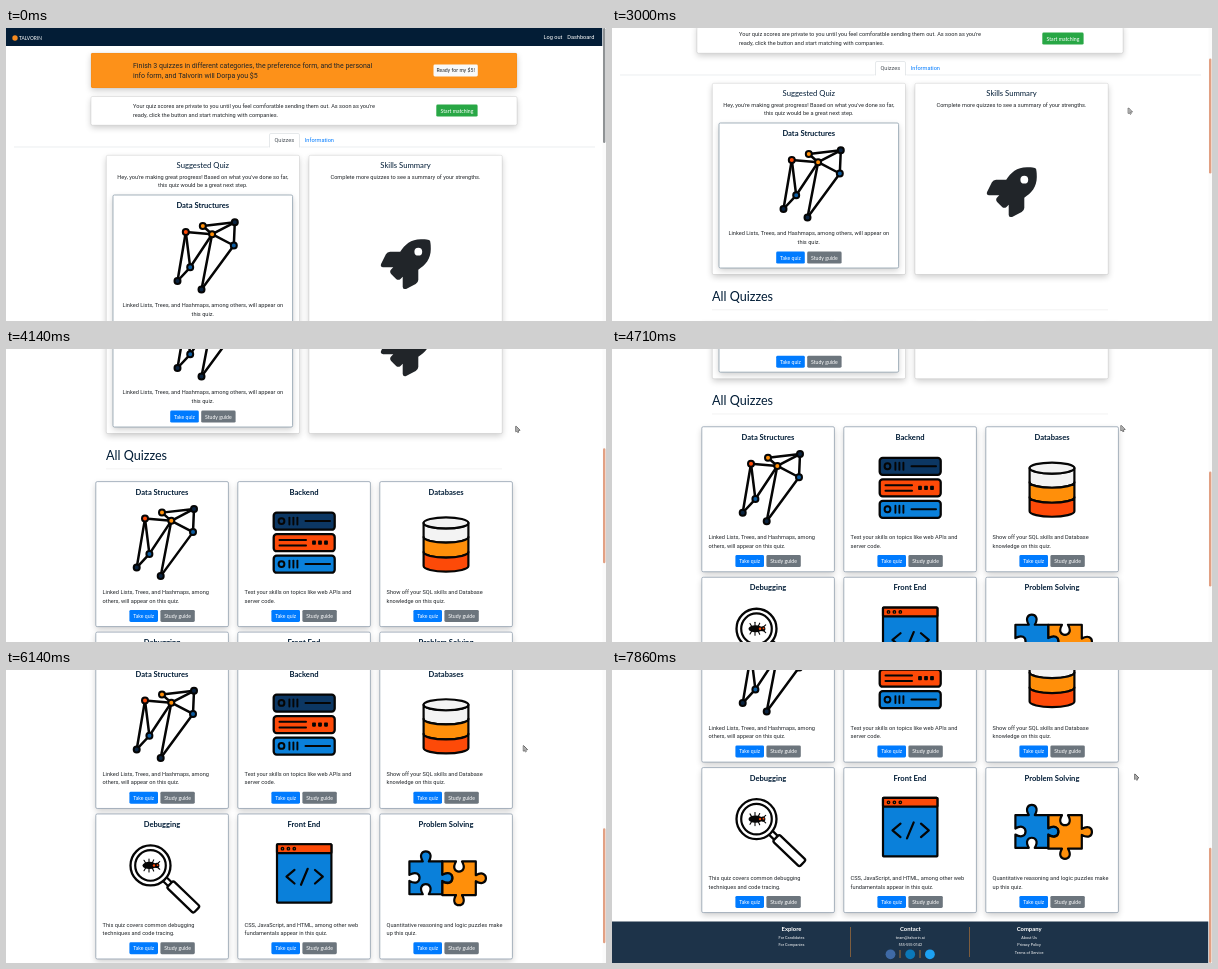
These frames come from a looping animation (600 px wide and 293 px high, 8000 ms). An HTML page with a canvas:

```html
<!DOCTYPE html>
<html lang="en">
<head>
<meta charset="utf-8">
<title>Quizzes</title>
<style>
html, body { margin: 0; width: 600px; height: 293px; overflow: hidden; background: #fff; }
canvas { display: block; }
</style>
</head>
<body>
<canvas id="stage" width="600" height="293"></canvas>
<script>
const ctx = document.getElementById('stage').getContext('2d');
const LOOP = 8000, FPS = 7;
const BODY = 'Roboto, "Liberation Sans", sans-serif';
const HEAD = 'Lato, "Open Sans", sans-serif';
const INK = '#212529', NAVY = '#001c36', BLACK = '#050505';
const ORANGE = '#ff8f0a', RED = '#fd4a08', BLUE = '#0a80da', DEEP = '#0c3763';
const LINK = '#007bff', GRAY = '#6c757d';

// [time, value, ...] keys
const SCROLL = [[1290, 0], [1860, 36], [2000, 37], [2143, 37], [3000, 72], [4143, 234],
  [5143, 330], [5571, 364], [6000, 364], [6571, 400.5], [7000, 419.5]];
const POINTER = [[143, 136, 235], [1000, 515.5, 80], [3000, 516.2, 80], [4143, 509.8, 77.3],
  [5143, 508.3, 76], [5571, 516.5, 75], [5714, 517.3, 75.7], [7143, 517.3, 75.7], [7857, 522.7, 104]];

function track(keys, t, i = 1) {
  if (t <= keys[0][0]) return keys[0][i];
  for (let k = 1; k < keys.length; k++) {
    const a = keys[k - 1], b = keys[k];
    if (t <= b[0]) return a[i] + (b[i] - a[i]) * (t - a[0]) / (b[0] - a[0]);
  }
  return keys[keys.length - 1][i];
}

function text(s, x, y, size, color = INK, align = 'left', face = BODY, weight = 400) {
  ctx.font = `${weight} ${size}px ${face}`;
  ctx.textAlign = align;
  ctx.fillStyle = color;
  ctx.fillText(s, x, y);
}
const body = (s, x, y, align) => text(s, x, y, 5.61, INK, align);
const title = (s, x, y) => text(s, x, y, 7.6, NAVY, 'center', HEAD, 700);

function box(x, y, w, h, r, fill, stroke, lw = 0.6) {
  ctx.beginPath();
  ctx.roundRect(x, y, w, h, r);
  if (fill) { ctx.fillStyle = fill; ctx.fill(); }
  if (stroke) { ctx.strokeStyle = stroke; ctx.lineWidth = lw; ctx.stroke(); }
}

function card(x, y, w, h, fill = '#fff', border = 'rgba(0,0,0,.13)') {
  ctx.save();
  ctx.shadowColor = 'rgba(0,0,0,.2)';
  ctx.shadowBlur = 6;
  ctx.shadowOffsetY = 2.6;
  box(x, y, w, h, 1.4, fill);
  ctx.restore();
  box(x, y, w, h, 1.4, null, border, 0.7);
}

function button(x, y, w, label, fill, color = '#fff') {
  box(x, y, w, 12, 1.4, fill);
  text(label, x + w / 2, y + 7.9, 5.15, color, 'center', HEAD);
}

function quizButtons(cx, y) {
  button(cx - 32.6, y, 28.6, 'Take quiz', LINK);
  button(cx - 1.6, y, 34.4, 'Study guide', GRAY);
}

function line(pts, lw = 2.2, color = BLACK) {
  ctx.beginPath();
  pts.forEach(([x, y]) => ctx.lineTo(x, y));
  ctx.strokeStyle = color;
  ctx.lineWidth = lw;
  ctx.stroke();
}

function dot(x, y, r, fill, stroke, lw = 2.2) {
  ctx.beginPath();
  ctx.arc(x, y, r, 0, 7);
  if (fill) { ctx.fillStyle = fill; ctx.fill(); }
  if (stroke) { ctx.strokeStyle = stroke; ctx.lineWidth = lw; ctx.stroke(); }
}

function at(x, y, draw) {
  ctx.save();
  ctx.translate(x, y);
  ctx.lineCap = ctx.lineJoin = 'round';
  draw();
  ctx.restore();
}

// Icons: local origin is the centre of the card's title line

const NODES = [[-17, 26.5, RED], [0, 20.5, ORANGE], [32, 16.8, '#0b2440'], [9.3, 28.7, ORANGE],
  [31, 40, '#0d5ca0'], [-12.6, 61.8, '#0d5ca0'], [-25.3, 75.5, '#0b2440'], [-1.3, 84, '#0b2440']];
const EDGES = ['06', '03', '05', '12', '13', '23', '24', '34', '35', '56', '47', '37'];

function graph() {
  EDGES.forEach(([a, b]) => line([NODES[a], NODES[b]], 2.5));
  NODES.forEach(([x, y, c]) => dot(x, y, 3, c, BLACK, 2));
}

function servers() {
  [DEEP, RED, BLUE].forEach((c, i) => {
    const y = 29 + i * 21.5;
    box(-30.3, y - 8.4, 61, 17, 3, c, BLACK, 2.3);
    if (i === 1) {
      line([[-24.5, y - 2.6], [2, y - 2.6]], 2);
      line([[-24.5, y + 3], [2, y + 3]], 2);
      [10, 16, 22].forEach(x => box(x - 1.9, y - 2, 3.8, 4.2, 0.8, BLACK));
    } else {
      dot(-22.5, y, 2.9, null, BLACK, 2);
      [-14.6, -10.6, -6.6].forEach(x => line([[x, y - 3.5], [x, y + 3.5]], 1.9));
      line([[1.5, y], [26, y]], 2);
    }
  });
}

function layer(top, bottom, color) {
  ctx.beginPath();
  ctx.moveTo(-22.4, top);
  ctx.lineTo(-22.4, bottom);
  ctx.ellipse(0, bottom, 22.4, 5.5, 0, Math.PI, 0, true);
  ctx.lineTo(22.4, top);
  ctx.ellipse(0, top, 22.4, 5.5, 0, 0, Math.PI);
  ctx.fillStyle = color;
  ctx.fill();
  ctx.strokeStyle = BLACK;
  ctx.lineWidth = 2.2;
  ctx.stroke();
}

function cylinder() {
  layer(30.8, 45, '#f3f3f3');
  layer(45, 60, ORANGE);
  layer(60, 74, RED);
  ctx.beginPath();
  ctx.ellipse(0, 30.8, 22.4, 5.5, 0, 0, 7);
  ctx.fillStyle = '#f3f3f3';
  ctx.fill();
  ctx.stroke();
}

function magnifier() {
  ctx.save();
  ctx.translate(-11.5, 41);
  ctx.save();
  ctx.rotate(Math.PI / 4 - 0.02);
  box(19, -2.6, 9, 5.2, 0, '#fff', BLACK, 2.2);
  box(27, -4.7, 37, 9.4, 2, '#fff', BLACK, 2.3);
  ctx.restore();
  dot(0, 0, 20, '#fff', BLACK, 2.3);
  dot(0, 0, 15.3, '#fff', BLACK, 2.2);
  for (const s of [-1, 1]) {
    line([[-4, s], [-6.5, s * 5.2]], 1.1);
    line([[-1.5, s], [-1.5, s * 6.5]], 1.1);
    line([[1, s], [3.2, s * 5.6]], 1.1);
    line([[6, s], [9.2, s * 3.8]], 1.1);
  }
  ctx.beginPath();
  ctx.ellipse(-1, 0, 7, 3.6, 0, 0, 7);
  ctx.fillStyle = BLACK;
  ctx.fill();
  dot(6.3, 0, 2.6, BLACK);
  dot(3.5, 0, 1.2, RED);
  dot(7, -0.4, 0.9, RED);
  ctx.restore();
}

function browser() {
  box(-27, 19.8, 54.4, 58.4, 0.6, BLUE, BLACK, 2.2);
  box(-27, 19.8, 54.4, 8.8, 0.6, RED, BLACK, 2.2);
  [-21.5, -15.6, -9.7].forEach(x => dot(x, 24.2, 1.2, ORANGE, BLACK, 1.4));
  line([[-9.5, 45.5], [-17.5, 52.2], [-9.5, 59]]);
  line([[3.7, 44.3], [-3, 60.3]]);
  line([[11, 45.5], [18.8, 52.2], [11, 59]]);
}

// sides: top, right, bottom, left; 1 is a knob, -1 a hole
function piece(x, y, size, sides, color) {
  ctx.save();
  ctx.translate(x, y);
  ctx.beginPath();
  ctx.moveTo(0, 0);
  const m = size / 2;
  for (const s of sides) {
    ctx.lineTo(m - 3, 0);
    ctx.bezierCurveTo(m - 11, -13.5 * s, m + 11, -13.5 * s, m + 3, 0);
    ctx.lineTo(size, 0);
    ctx.translate(size, 0);
    ctx.rotate(Math.PI / 2);
  }
  ctx.closePath();
  ctx.fillStyle = color;
  ctx.fill();
  ctx.strokeStyle = BLACK;
  ctx.lineWidth = 2.2;
  ctx.stroke();
  ctx.restore();
}

function puzzle() {
  piece(-3.8, 37, 33.6, [-1, 1, 1, -1], ORANGE);
  piece(-36.6, 37, 32.8, [1, 1, -1, -1], BLUE);
}

const ROCKET = new Path2D('M49.3 1.9Q49 1 48.1.7C45 0 42.5 0 40.1 0C30 0 24 5.4 19.4 12.5H9.3' +
  'Q6.4 12.8 5.1 15.1L.25 24.7Q-.8 27.5 2.3 28.1H12.5L10.3 30.3Q8.4 32.5 10.3 34.7L15.3 39.7' +
  'Q17.5 41.6 19.7 39.7L21.9 37.5V47.7Q22.3 50.6 25.3 49.7L34.9 44.9Q37.2 43.5 37.5 40.7V30.5' +
  'C44.6 26 50 20 50 9.9C50 7.5 50 5 49.3 1.9Z');

const QUIZZES = [
  ['Data Structures', graph, 'Linked Lists, Trees, and Hashmaps, among', 'others, will appear on this quiz.'],
  ['Backend', servers, 'Test your skills on topics like web APIs and', 'server code.'],
  ['Databases', cylinder, 'Show off your SQL skills and Database', 'knowledge on this quiz.'],
  ['Debugging', magnifier, 'This quiz covers common debugging', 'techniques and code tracing.'],
  ['Front End', browser, 'CSS, JavaScript, and HTML, among other web', 'fundamentals appear in this quiz.'],
  ['Problem Solving', puzzle, 'Quantitative reasoning and logic puzzles make', 'up this quiz.']
];

function header() {
  ctx.fillStyle = '#031d36';
  ctx.fillRect(0, 0, 596.5, 18);
  dot(9, 10, 2.7, '#f58a1f');
  text('TALVORIN', 13, 12, 4.8, '#fff', 'left', HEAD);
  text('Log out', 537.5, 11.3, 5.61, '#fff');
  text('Dashboard', 561.2, 11.3, 5.61, '#fff');

  card(85, 25, 426, 35, '#fd9119', 'rgba(0,0,0,.06)');
  text('Finish 3 quizzes in different categories, the preference form, and the personal', 127, 39.5, 7.01);
  text('info form, and Talvorin will Dorpa you $5', 127, 50, 7.01);
  button(427.5, 36.5, 44.3, 'Ready for my $5!', '#f8f9fa', INK);

  card(85, 68.5, 426, 28.7);
  body("Your quiz scores are private to you until you feel comforatble sending them out. As soon as you're", 127, 80.3);
  body('ready, click the button and start matching with companies.', 127, 88.7);
  button(430.3, 76.6, 41.3, 'Start matching', '#28a745');

  line([[8, 119], [589, 119]], 0.6, '#dee2e6');
  box(263.5, 105.5, 30, 15, [1.4, 1.4, 0, 0], '#fff', '#d5dade', 0.6);
  ctx.fillStyle = '#fff';
  ctx.fillRect(262, 119.4, 33, 2);
  text('Quizzes', 278.3, 114.3, 5.61, '#495057', 'center');
  text('Information', 313.4, 114.3, 5.61, LINK, 'center');
}

function summary() {
  const cx = 196.8;
  card(100.3, 127.3, 193.2, 191.2);
  text('Suggested Quiz', cx, 140.3, 7.7, NAVY, 'center', HEAD);
  body("Hey, you're making great progress! Based on what you've done so far,", cx, 151.1, 'center');
  body('this quiz would be a great next step.', cx, 159.4, 'center');
  card(107, 167, 179.6, 145, '#fff', '#7f92a3');
  title('Data Structures', cx, 180.2);
  at(cx, 177.5, graph);
  body('Linked Lists, Trees, and Hashmaps, among others, will appear on', cx, 279.2, 'center');
  body('this quiz.', cx, 287.6, 'center');
  quizButtons(cx, 295.6);

  card(303, 127.3, 193.2, 191.2);
  text('Skills Summary', 399.5, 140.3, 7.7, NAVY, 'center', HEAD);
  body('Complete more quizzes to see a summary of your strengths.', 399.5, 151.1, 'center');
  at(374.8, 211.2, () => {
    ctx.fillStyle = INK;
    ctx.fill(ROCKET);
    dot(37.5, 12.5, 3.9, '#fff');
  });
}

function grid() {
  text('All Quizzes', 100, 345.3, 12.6, NAVY, 'left', HEAD);
  line([[100, 353.8], [496, 353.8]], 0.5, '#e6e6e6');
  QUIZZES.forEach(([name, icon, a, b], i) => {
    const x = 89.8 + (i % 3) * 142, y = 366.6 + (i > 2 ? 150.5 : 0), cx = x + 66.2;
    card(x, y, 132.6, 145, '#fff', '#8696a6');
    title(name, cx, y + 13.1);
    at(cx, y + 10.5, icon);
    body(a, x + 6.8, y + 112.6);
    body(b, x + 6.8, y + 121);
    quizButtons(cx, y + 128.3);
  });
}

function footer() {
  ctx.fillStyle = '#1d3349';
  ctx.fillRect(0, 671, 596.5, 43);
  const cols = [
    ['Explore', 'For Candidates', 'For Companies'],
    ['Contact', 'team@talvorin.ai', '555-555-0142'],
    ['Company', 'About Us', 'Privacy Policy', 'Terms of Service']
  ];
  cols.forEach(([head, ...rows], i) => {
    const x = 179.5 + i * 118.8;
    text(head, x, 680.2, 5.9, '#fff', 'center', HEAD, 700);
    rows.forEach((s, k) => text(s, x, 688.3 + k * 7.5, 3.85, '#fff', 'center'));
  });
  [238.5, 357.5].forEach(x => line([[x, 676.5], [x, 706.5]], 0.7, '#a8703a'));
  [288, 308].forEach(x => line([[x, 699.5], [x, 707.5]], 0.7, '#d98530'));
  ['#3f6aa6', '#0b78b8', '#1da1f2'].forEach((c, i) => dot(278.5 + i * 19.7, 703.8, 4.9, c));
}

function scrollbar(scroll, active) {
  ctx.fillStyle = '#fbfbfb';
  ctx.fillRect(596.5, 0, 3.5, 293);
  box(597, scroll * 0.424, 2.4, 115, 1.2, active ? '#e2a083' : '#8f9294');
}

function pointer(x, y) {
  at(x, y, () => {
    ctx.beginPath();
    [[0, 0], [0, 5.4], [1.2, 4.4], [2, 6.2], [2.9, 5.8], [2.2, 4.1], [3.8, 4]].forEach(p => ctx.lineTo(...p));
    ctx.closePath();
    ctx.strokeStyle = '#444';
    ctx.lineWidth = 0.9;
    ctx.stroke();
    ctx.fillStyle = '#aaa';
    ctx.fill();
  });
}

function frame(now) {
  const ms = now % LOOP;
  const t = Math.floor((ms + 5) * FPS / 1000) % (LOOP * FPS / 1000) * 1000 / FPS;
  const scroll = track(SCROLL, t);
  ctx.fillStyle = '#fff';
  ctx.fillRect(0, 0, 600, 293);
  ctx.save();
  ctx.translate(0, -scroll);
  header();
  summary();
  grid();
  footer();
  ctx.restore();
  scrollbar(scroll, t > 100);
  if (t > 100) pointer(track(POINTER, t, 1), track(POINTER, t, 2));
}

const start = performance.now();
function tick() {
  frame(performance.now() - start);
  requestAnimationFrame(tick);
}
tick();
</script>
</body>
</html>
```
